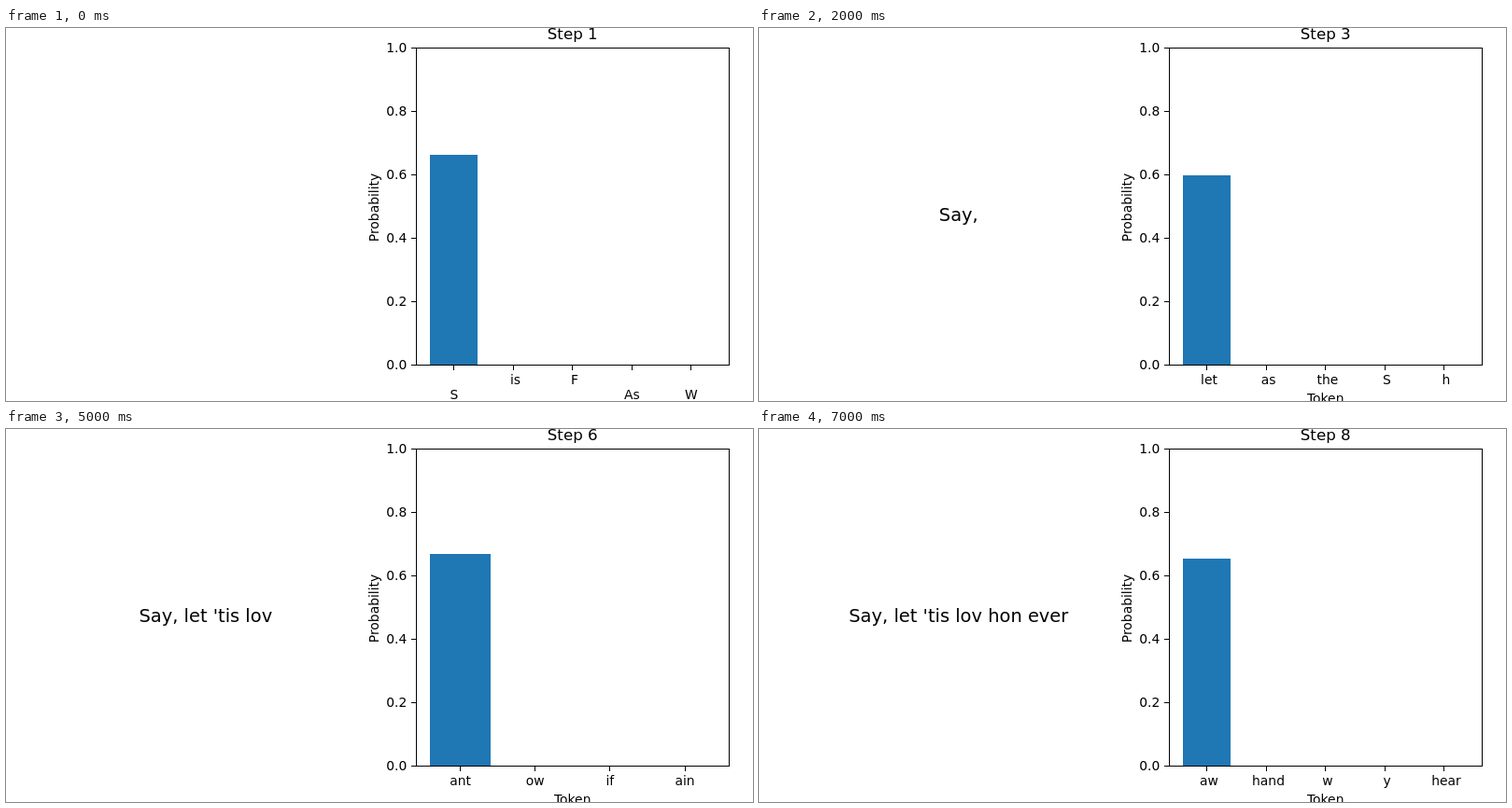
Write an HTML page that moves like this. It is 800x400 px and loops after 8 s.

```html
<!DOCTYPE html>
<html lang="en">
<head>
<meta charset="utf-8">
<title>Token probabilities</title>
<style>
  html, body { margin: 0; width: 100%; height: 100%; overflow: hidden; background: #fff; }
  svg { display: block; width: 800px; height: 400px; }
  text { font-family: "DejaVu Sans", sans-serif; font-size: 13.89px; white-space: pre; fill: #000; }
  .mid { text-anchor: middle; }
  .end { text-anchor: end; }
  #title { font-size: 16.67px; }
  #phrase { font-size: 19.44px; }
  rect { shape-rendering: crispEdges; }
</style>
</head>
<body>
<svg id="stage" viewBox="0 0 800 400">
  <text id="phrase" class="mid" x="213.8" y="207"></text>
  <text id="title" class="mid" x="606.7" y="12"></text>
  <text class="mid" transform="translate(399 192.5) rotate(-90)">Probability</text>
  <g id="bars"></g>
  <g id="axes"></g>
  <g id="labels"></g>
  <text id="caption" class="mid" x="606.7" y="402">Token</text>
</svg>
<script>
const NS = "http://www.w3.org/2000/svg";
const STEP = 1000;
const box = { left: 439, right: 774, top: 21, bottom: 361 };

// Each step: word added to the phrase, bar heights, tick labels.
const steps = [
  { add: "", p: [0.662], names: ["\nS", " is", " F", "\nAs", "\nW"] },
  { add: "S", p: [0.66], names: ["ay", "o", "he", "ir", "at"] },
  { add: "ay,", p: [0.597], names: [" let", " as", " the", " S", " h"] },
  { add: " let", p: [0.667], names: [" the", " P", " F", " by", " him"] },
  { add: " 'tis", p: [0.189, 0.006], names: [" lov", " c", " ch", " li", " b"] },
  { add: " lov", p: [0.667], names: ["ant", "ow", "if", "ain"] },
  { add: " hon", p: [0.66], names: [" ever", " my", " be", " th", " I"] },
  { add: " ever", p: [0.652], names: [" aw", " hand", " w", " y", " hear"] }
];

const $ = id => document.getElementById(id);

function make(parent, tag, attrs, content) {
  const el = document.createElementNS(NS, tag);
  for (const key in attrs) el.setAttribute(key, attrs[key]);
  if (content !== undefined) {
    el.setAttributeNS("http://www.w3.org/XML/1998/namespace", "xml:space", "preserve");
    el.textContent = content;
  }
  parent.appendChild(el);
}

const yOf = v => Math.round(box.bottom - v * (box.bottom - box.top));

function block(parent, x, y, width, height, fill = "#000") {
  make(parent, "rect", { x, y, width, height, fill });
}

function drawAxes() {
  const g = $("axes");
  const w = box.right - box.left + 1, h = box.bottom - box.top + 1;
  block(g, box.left, box.top, w, 1);
  block(g, box.left, box.bottom, w, 1);
  block(g, box.left, box.top, 1, h);
  block(g, box.right, box.top, 1, h);
  for (let i = 0; i <= 5; i++) {
    const y = yOf(i / 5);
    block(g, box.left - 5, y, 5, 1);
    make(g, "text", { class: "end", x: 429.3, y: y + 5 }, (i / 5).toFixed(1));
  }
}

function drawStep(n) {
  const { p, names } = steps[n];
  const bars = $("bars"), labels = $("labels");
  bars.replaceChildren();
  labels.replaceChildren();
  $("phrase").textContent = steps.slice(0, n + 1).map(s => s.add).join("");
  $("title").textContent = "Step " + (n + 1);

  // Bars are 0.8 units wide with a 5% margin on both sides.
  const span = names.length - 0.2;
  const unit = 335.2 / (span * 1.1);
  const start = 439.2 + span * 0.05 * unit;
  let wrapped = false;
  names.forEach((name, i) => {
    const left = start + i * unit;
    const mid = left + 0.4 * unit;
    if (p[i]) {
      const x = Math.round(left), y = yOf(p[i]);
      block(bars, x, y, Math.round(left + 0.8 * unit) - x, box.bottom - y, "#1f77b4");
    }
    block(labels, Math.floor(mid), box.bottom + 1, 1, 5);
    const low = name[0] === "\n";
    wrapped = wrapped || low;
    make(labels, "text", { class: "mid", x: mid, y: low ? 398 : 382 }, name.replace("\n", ""));
  });
  $("caption").setAttribute("visibility", wrapped ? "hidden" : "visible");
}

let shown = -1;
function frame() {
  const n = Math.floor(performance.now() / STEP) % steps.length;
  if (n !== shown) drawStep(shown = n);
  requestAnimationFrame(frame);
}

drawAxes();
frame();
</script>
</body>
</html>
```
